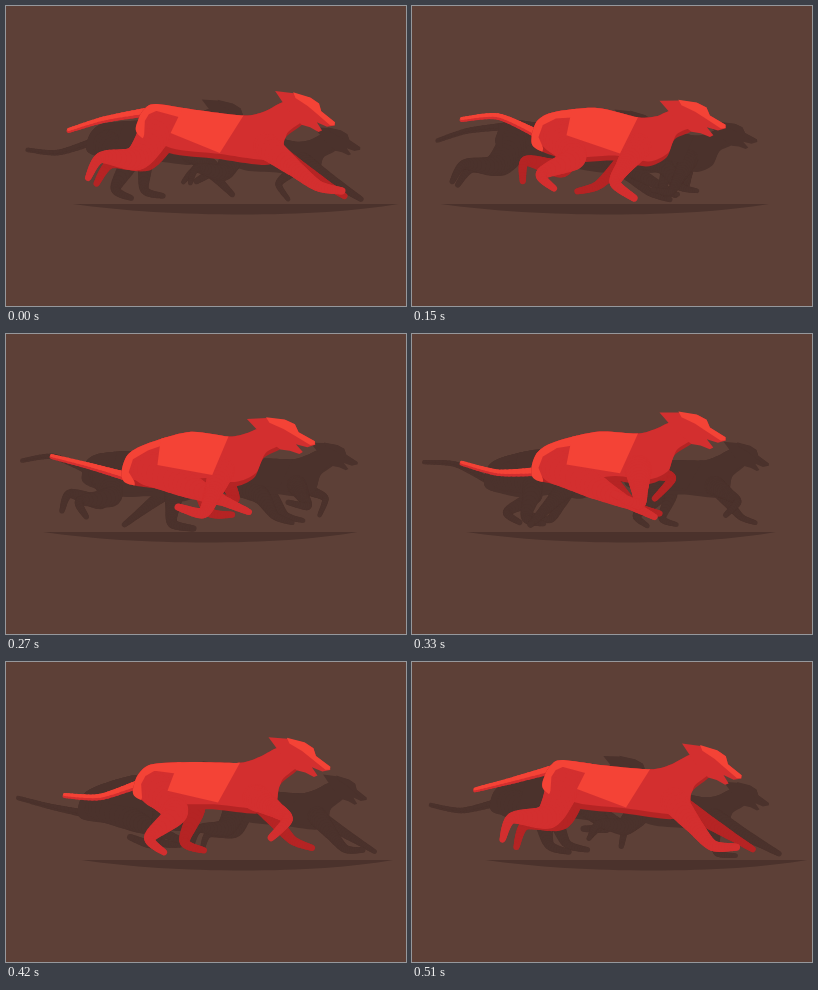
Recreate the animation shown at these times as an HTML page with a canvas. Size 400 by 300 pixels, loop 540 ms.

```html
<!DOCTYPE html>
<html lang="en">
<head>
<meta charset="utf-8">
<title>Running hounds</title>
<style>
html, body { margin: 0; width: 100%; height: 100%; overflow: hidden; background: #5d4037; }
canvas { display: block; width: 400px; height: 300px; }
</style>
</head>
<body>
<canvas id="stage" width="400" height="300"></canvas>
<script>
const ctx = document.getElementById('stage').getContext('2d');
const LOOP = 540, STEP = 30, RAD = Math.PI / 180;
const RED = { light: '#f44336', mid: '#d32f2f', dark: '#b52424' };
const SHADE = { light: '#4b322c', mid: '#4b322c', dark: '#4b322c' };

// Resting place of each point, its stretch along x, and the cosine and sine of its bob.
const RIG = {
  seat: [124, 126, 9, -13, 3],
  haunch: [130, 112, 9, -9, 1],
  rump: [145, 104, 5, -6, 1],
  loin: [187, 101, 4, 3, 1.5],
  withers: [230, 106, 8, 3.5, 6],
  nape: [249, 102.5, 10, 3, 8.5],
  ear: [255, 85, 15, 0, 10],
  nose: [319, 114, 10.5, 4.5, 8],
  throat: [268.5, 128, 11.5, 4, 6],
  chest: [262, 147, 15, 3, 5],
  brisket: [243, 156, 17, 3, 5],
  belly: [205, 151, 8, 2, 4],
  groin: [163, 151, 0, -4, 4],
  thigh: [127, 139, 5, -11, 2],
  tailBase: [130, 124, 12, -18, 0],
  tailMid: [90, 123, 8, -9, -14],
  tailTip: [54, 124, 9, 1, -10],
  clothBack: [165, 105, 11, 0, 0],
  clothFront: [210, 144, 4, 3, 4],
  clothRear: [158, 129, 7, -2, 0],
  hip: [147, 128, 5, -6, 0],
  shoulder: [238, 138, 24, 2, 3]
};

// Paw paths: six stops, evenly spaced over one stride.
const HIND = [[82, 172], [88, 170], [172, 187], [243, 178], [228, 186], [125, 190]];
const FORE = [[336, 185], [322, 192], [180, 190], [172, 173], [222, 158], [286, 184]];

const cos = deg => Math.cos(deg * RAD), sin = deg => Math.sin(deg * RAD);

function skeleton(deg) {
  const stretch = cos(deg + 20), bones = {};
  for (const [name, [x, y, sx, c, s]] of Object.entries(RIG)) {
    bones[name] = [x + sx * stretch, y + c * cos(deg) + s * sin(deg)];
  }
  return bones;
}

function hermite(a, b, c, d, u, pull = .5) {
  const m = (c - a) * pull, q = (d - b) * pull, e = c - b;
  return b + u * (m + u * (3 * e - 2 * m - q + u * (m + q - 2 * e)));
}

function paw(path, deg) {
  const n = path.length, pos = ((deg % 360 + 360) % 360) / 360 * n, i = Math.floor(pos);
  const at = k => path[(k + n) % n];
  return [0, 1].map(k => hermite(at(i - 1)[k], at(i)[k], at(i + 1)[k], at(i + 2)[k], pos - i));
}

// Joints between root and paw fold sideways by the unused length of the leg.
function leg(root, foot, reach, upper, lower) {
  const dx = foot[0] - root[0], dy = foot[1] - root[1], d = Math.hypot(dx, dy);
  const slack = Math.sqrt(Math.max(0, reach * reach - d * d)) / d;
  const joint = (along, fold) =>
    [root[0] + dx * along + dy * fold * slack, root[1] + dy * along - dx * fold * slack];
  return [root, joint(.4, upper), joint(.74, lower), foot];
}

const hindLeg = (hip, deg) => leg(hip, paw(HIND, deg), 105, .2, -.15);

function foreLeg(shoulder, deg) {
  const bend = Math.tanh(-3 * cos(deg - 40));
  return leg(shoulder, paw(FORE, deg), 92, .18 * bend, .29 * bend);
}

function polygon(pts, fill) {
  ctx.beginPath();
  pts.forEach(p => ctx.lineTo(...p));
  ctx.closePath();
  ctx.fillStyle = fill;
  ctx.fill();
}

function blob(pts) {
  const path = new Path2D(), n = pts.length, at = i => pts[(i + n) % n];
  path.moveTo(...pts[0]);
  for (let i = 0; i < n; i++) {
    const [a, b, c, d] = [at(i - 1), at(i), at(i + 1), at(i + 2)];
    path.bezierCurveTo(b[0] + (c[0] - a[0]) / 7, b[1] + (c[1] - a[1]) / 7,
      c[0] - (d[0] - b[0]) / 7, c[1] - (d[1] - b[1]) / 7, c[0], c[1]);
  }
  path.closePath();
  return path;
}

// Tapered curve through joints.
function limb(pts, widths, color, dy = 0) {
  const last = pts.length - 1, N = 10;
  const at = i => pts[Math.max(0, Math.min(last, i))];
  ctx.strokeStyle = color;
  ctx.lineCap = 'round';
  let prev = pts[0];
  for (let s = 1; s <= last * N; s++) {
    const i = Math.floor((s - 1) / N), u = s / N - i;
    const p = [0, 1].map(k => hermite(at(i - 1)[k], at(i)[k], at(i + 1)[k], at(i + 2)[k], u, .4));
    ctx.lineWidth = widths[i] + (widths[i + 1] - widths[i]) * u;
    ctx.beginPath();
    ctx.moveTo(prev[0], prev[1] + dy);
    ctx.lineTo(p[0], p[1] + dy);
    ctx.stroke();
    prev = p;
  }
}

function hound(t, color, x = 0, y = 0, scale = 1) {
  const deg = t / LOOP * 360, b = skeleton(deg);
  const ux = (b.nose[0] - b.ear[0]) / 71, uy = (b.nose[1] - b.ear[1]) / 71;
  const onHead = ([px, py]) => [b.ear[0] + px * ux - py * uy, b.ear[1] + px * uy + py * ux];
  const body = blob([b.seat, b.haunch, b.rump, b.loin, b.withers, b.nape,
    ...[[14, 5], [30, 2], [42, 14]].map(onHead),
    b.throat, b.chest, b.brisket, b.belly, b.groin, b.thigh]);

  ctx.save();
  ctx.translate(x, y);
  ctx.scale(scale, scale);

  limb(hindLeg([b.hip[0] + 12, b.hip[1] + 3], deg - 20), [26, 20, 10, 6], color.dark);
  limb(foreLeg(b.shoulder, deg + 40), [22, 14, 9, 6], color.dark);
  const tail = [b.tailBase, b.tailMid, b.tailTip];
  limb(tail, [9, 6, 4], color.mid);
  limb(tail, [6, 4, 3], color.light, -1.5);

  // Torso with a darker strip along the belly.
  ctx.fillStyle = color.dark;
  ctx.fill(body);
  ctx.save();
  ctx.clip(body);
  ctx.translate(2, -5);
  ctx.fillStyle = color.mid;
  ctx.fill(body);
  ctx.restore();

  limb(hindLeg(b.hip, deg), [36, 25, 11, 6], color.mid);
  limb(foreLeg(b.shoulder, deg), [28, 17, 11, 7], color.mid);

  // Lit back and saddle.
  ctx.save();
  ctx.clip(body);
  ctx.beginPath();
  [b.thigh, b.seat, b.haunch, b.rump, b.clothBack].forEach(p => ctx.lineTo(...p));
  ctx.strokeStyle = color.light;
  ctx.lineWidth = 13;
  ctx.lineJoin = 'round';
  ctx.stroke();
  const [back, top] = [b.clothBack, b.withers];
  polygon([[back[0] + 2, back[1] - 14], [top[0] + 5, top[1] - 12], top,
    b.clothFront, b.clothRear, back], color.light);
  ctx.restore();

  polygon([[0, 0], [18, -7.5], [36, -12], [46, -11], [52, -5], [70, -2], [71.5, 1], [65, 6],
    [53.5, 7], [62.5, 12], [60, 15], [50, 15], [41, 17], [24, 12], [12, 6]].map(onHead), color.mid);
  polygon([[17, -8], [35, -12], [46, -11], [52, -5], [70, -2], [71, 1], [67, 3],
    [47, -1], [37, -3], [22, -4]].map(onHead), color.light);
  ctx.restore();
}

function floorShadow(t) {
  const deg = t / LOOP * 360;
  const l = 52 + 26 * cos(deg + 55), w = 320 + 11 * cos(deg - 60), r = l + w;
  ctx.beginPath();
  ctx.moveTo(l, 198);
  ctx.lineTo(r, 198);
  ctx.bezierCurveTo(r - w * .25, 212, l + w * .3, 212, l, 198);
  ctx.fillStyle = SHADE.mid;
  ctx.fill();
}

function draw(ms) {
  const t = Math.floor(ms / STEP) * STEP % LOOP;
  ctx.fillStyle = '#5d4037';
  ctx.fillRect(0, 0, 400, 300);
  floorShadow(t);
  hound(t + 405, SHADE, -28, 29, .86);
  hound(t + 90, SHADE, 120, 53, .73);
  hound(t, RED);
}

const start = performance.now();
function tick() {
  draw(performance.now() - start);
  requestAnimationFrame(tick);
}
tick();
</script>
</body>
</html>
```
